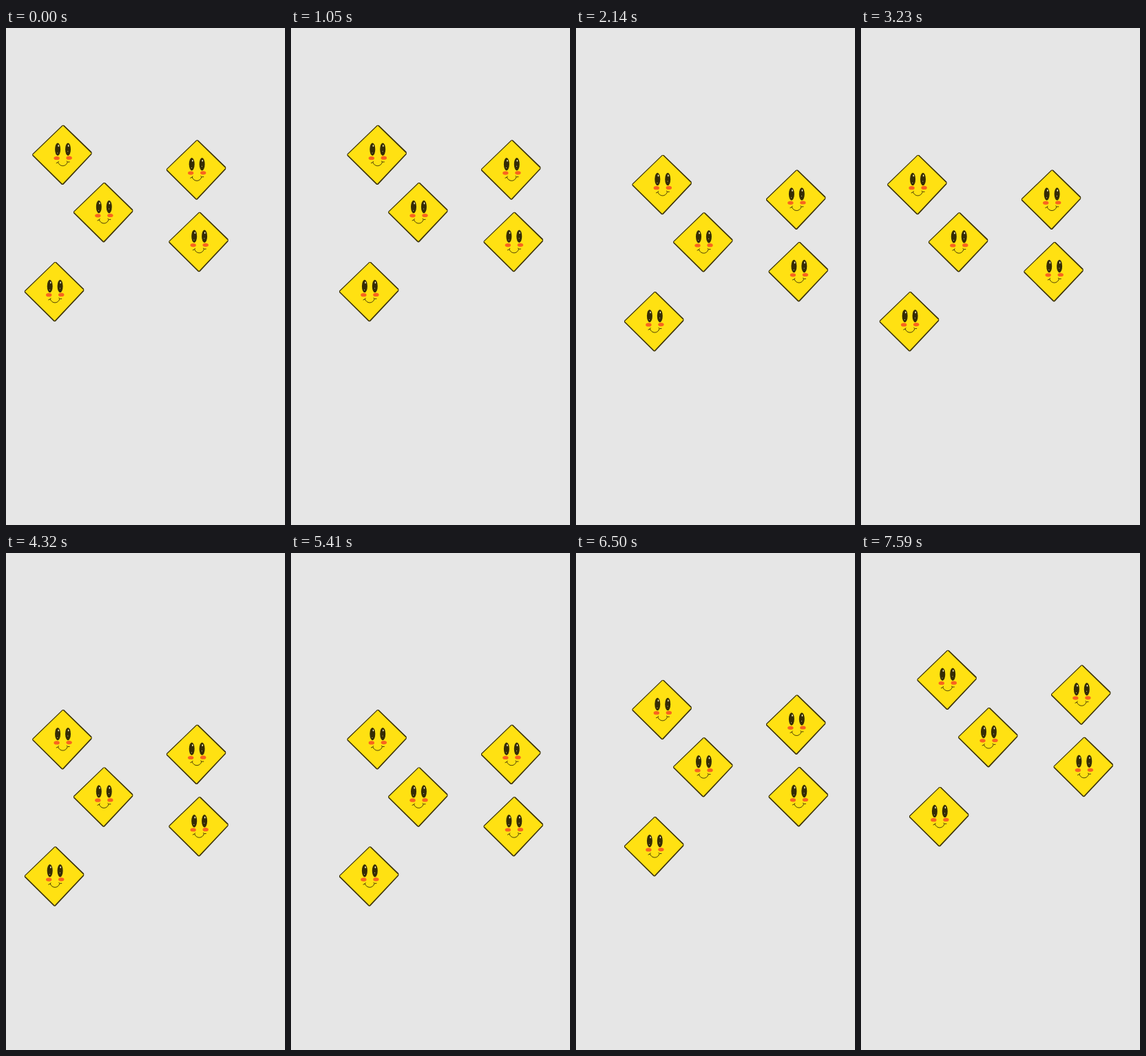
An HTML page for the animation above (8.68 s loop, 405 by 720 pixels).

```html
<!DOCTYPE html>
<html lang="en">
<head>
<meta charset="utf-8">
<title>Hopping diamonds</title>
<style>
  html, body { margin: 0; width: 100%; height: 100%; overflow: hidden; background: #e6e6e6; }
  svg { display: block; width: 100%; height: 100%; }
</style>
</head>
<body>
<svg viewBox="0 0 405 720">
  <defs>
    <clipPath id="box"><rect width="86.4" height="86.4"/></clipPath>
    <g id="tile" clip-path="url(#box)">
      <path d="M44.8 -1.2L88 40.5L43.9 87.5L-1.2 43Z" fill="#3a3108"/>
      <path d="M44.5 .7L85.7 40.7L43.8 85.1L.8 42.8Z" fill="#ffe112"/>
      <g fill="#352c05">
        <ellipse cx="36.9" cy="35" rx="4" ry="9.2"/>
        <ellipse cx="51.8" cy="35" rx="4" ry="9.2"/>
      </g>
      <g fill="#fff7c8">
        <ellipse cx="38" cy="30" rx=".8" ry="1.4"/>
        <ellipse cx="52.4" cy="30" rx=".8" ry="1.4"/>
        <circle cx="36.6" cy="40.3" r=".5"/>
        <circle cx="51.6" cy="38" r=".5"/>
      </g>
      <g fill="#f9641e">
        <ellipse cx="35.4" cy="47.8" rx="4.2" ry="2.6"/>
        <ellipse cx="53.4" cy="47.5" rx="4.2" ry="2.6"/>
      </g>
      <path d="M35 55Q37.5 54.5 38.3 52.6M37.5 54C39.5 60.7 49 61 51 53.8M49.9 52.4Q51.2 54.2 54 53.4"
        fill="none" stroke="#4a3d06" stroke-width="1" stroke-linecap="round"/>
    </g>
  </defs>
  <g id="group">
    <use href="#tile" x="38.2" y="140.7"/>
    <use href="#tile" x="97.9" y="224"/>
    <use href="#tile" x="26.8" y="338.9"/>
    <use href="#tile" x="232.8" y="162.3"/>
    <use href="#tile" x="236.3" y="266.8"/>
  </g>
</svg>
<script>
  const group = document.getElementById('group');
  const FIRST = 1050, HOLD = 1090, LOOP = 8680, STEP = 43.2;
  const path = [[0, 0], [1, 0], [1, 1], [0, 1], [0, 2], [1, 2], [1, 1], [1, 0]];

  function draw(time) {
    const t = time % LOOP;
    const [col, row] = path[t < FIRST ? 0 : 1 + Math.floor((t - FIRST) / HOLD)];
    group.setAttribute('transform', `translate(${col * STEP} ${row * STEP})`);
  }

  const start = performance.now();
  function tick() {
    draw(performance.now() - start);
    requestAnimationFrame(tick);
  }
  tick();
</script>
</body>
</html>
```
